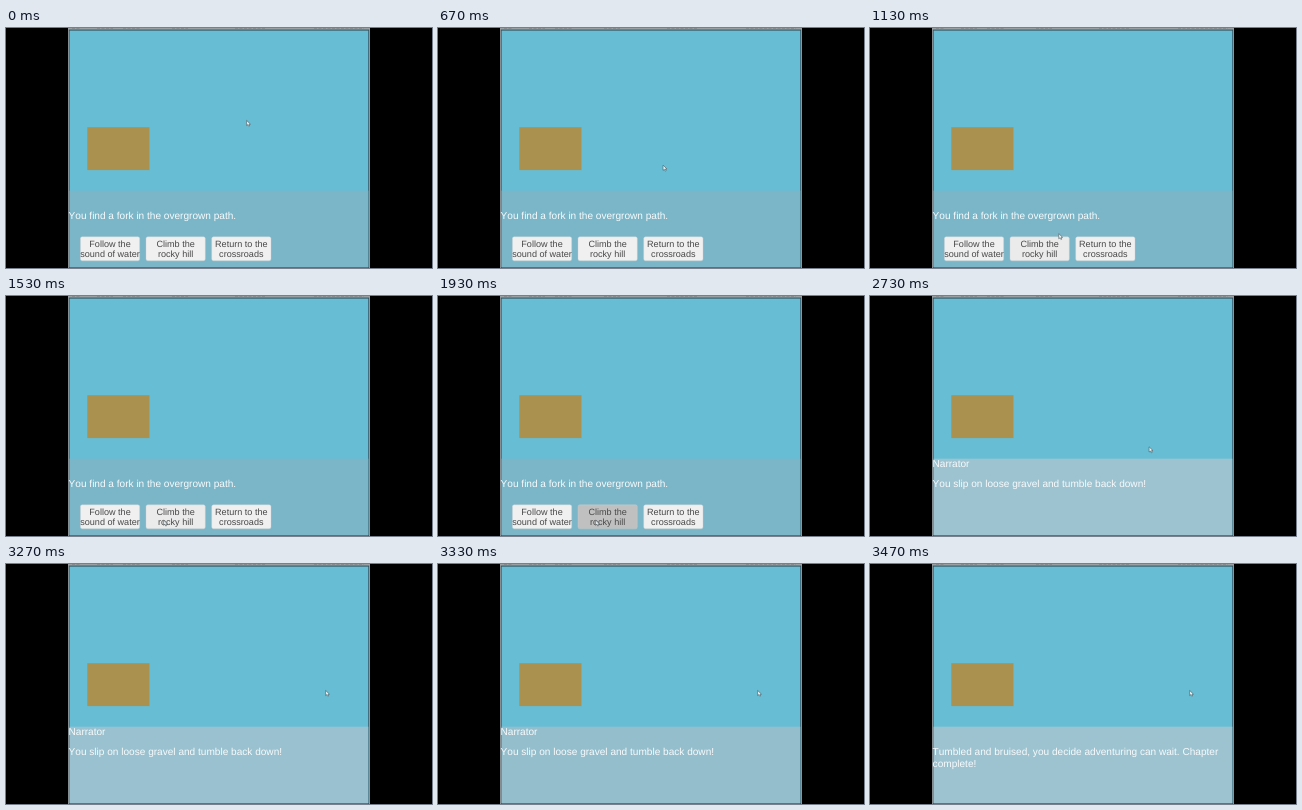
Write an HTML page that moves like this. It is 426 by 240 pixels and loops after 4270 ms.

```html
<!DOCTYPE html>
<html lang="en">
<head>
<meta charset="utf-8">
<title>Overgrown path</title>
<style>
  html, body { margin: 0; width: 100%; height: 100%; overflow: hidden; background: #000; }
  svg { display: block; width: 100%; height: 100%; }
  text {
    font-family: "Liberation Sans", Arial, sans-serif;
    font-kerning: none;
    text-rendering: geometricPrecision;
  }
  .story { font-size: 10.08px; fill: #f7fafb; }
  .label { font-size: 9.08px; fill: #484848; text-anchor: middle; }
</style>
</head>
<body>
<svg viewBox="0 0 426 240">
  <rect width="426" height="240"/>
  <rect x="62" width="302" height="240" fill="#9a9fa2"/>
  <path d="M66 .3h8M91 .3h16M117 .3h18M166 .3h16M229 .3h31M308 .3h50" stroke="#74777a" stroke-width=".6" stroke-dasharray="3 1.5"/>
  <rect x="62.8" y="1.6" width="300.3" height="238.4" fill="#34505c"/>
  <rect x="63.6" y="2.6" width="298.7" height="236.6" fill="#67bdd3"/>
  <rect x="81.3" y="99.2" width="62.2" height="42.9" fill="#ab9150"/>
  <rect id="panel" x="63.6" y="162.7" width="298.7" height="76.5"/>
  <g class="story">
    <text id="speaker" x="62.5" y="171.3">Narrator</text>
    <text id="line1" x="62.6" y="191.3"></text>
    <text id="line2" x="62.6" y="202.7"></text>
  </g>
  <g id="choices"></g>
  <path id="cursor" d="M0 0V5.2L1.3 4.2L2.2 6L3.1 5.5L2.3 3.8H3.9Z" fill="#eef3f4" stroke="#4c5a60" stroke-width=".6"/>
</svg>
<script>
const LOOP = 4270, TICK = 200 / 3;
const $ = id => document.getElementById(id);
const clamp = v => Math.min(1, Math.max(0, v));
const easeOut = p => 1 - (1 - p) ** 2;
const lerp = (a, b, p) => a + (b - a) * p;
const mix = (a, b, p) => `rgb(${a.map((v, i) => Math.round(lerp(v, b[i], p)))})`;

const DISABLED = [123, 182, 200], PRESSED = [146, 188, 203], NORMAL = [157, 195, 209];
const LIGHT = [240, 240, 240], HOVER = [235, 235, 235], DOWN = [192, 192, 192];

const choices = [
  [74.4, "Follow the", "sound of water"],
  [140, "Climb the", "rocky hill"],
  [205.7, "Return to the", "crossroads"]
];
$("choices").innerHTML = choices.map(([x, top, bottom]) => `
  <rect x="${x}" y="208.8" width="59.3" height="24" rx="1.8" fill="#f0f0f0" stroke="#c4cccf" stroke-width=".4"/>
  <text class="label" x="${x + 29.6}" y="219.1">${top}</text>
  <text class="label" x="${x + 29.6}" y="229.1">${bottom}</text>`).join("");
const climb = $("choices").querySelectorAll("rect")[1];

const scenes = [
  ["You find a fork in the overgrown path.", ""],
  ["You slip on loose gravel and tumble back down!", ""],
  ["Tumbled and bruised, you decide adventuring can wait. Chapter", "complete!"]
];

function cursorAt(tick) {
  const down = clamp((tick - 7) / 16), away = clamp((tick - 37) / 8);
  return away > 0
    ? [lerp(159, 321, easeOut(away)), lerp(227, 129.3, easeOut(away))]
    : [lerp(242, 159, down), lerp(95.3, 227, easeOut(down))];
}

function panelColor(tick) {
  if (tick < 30) return mix(DISABLED, DISABLED, 0);
  if (tick < 49) return mix(PRESSED, NORMAL, clamp((tick - 30) / 2));
  if (tick < 51) return mix(NORMAL, PRESSED, (tick - 48) * 0.35);
  return mix(PRESSED, NORMAL, clamp((tick - 50) / 2));
}

function draw(time) {
  // The picture advances in 15 steps per second.
  const tick = Math.floor((time % LOOP + 4) / TICK);
  const scene = tick < 30 ? 0 : tick < 51 ? 1 : 2;
  const [x, y] = cursorAt(tick);
  $("cursor").setAttribute("transform", `translate(${x - 1.4} ${y - 2.9})`);
  $("panel").setAttribute("fill", panelColor(tick));
  $("line1").textContent = scenes[scene][0];
  $("line2").textContent = scenes[scene][1];
  $("speaker").style.display = scene === 1 ? "" : "none";
  $("choices").style.display = scene === 0 ? "" : "none";
  climb.setAttribute("fill", tick < 28
    ? mix(LIGHT, HOVER, clamp((tick - 15) / 2))
    : mix(HOVER, DOWN, clamp((tick - 27) / 2)));
}

const start = performance.now();
function frame() {
  draw(performance.now() - start);
  requestAnimationFrame(frame);
}
frame();
</script>
</body>
</html>
```
